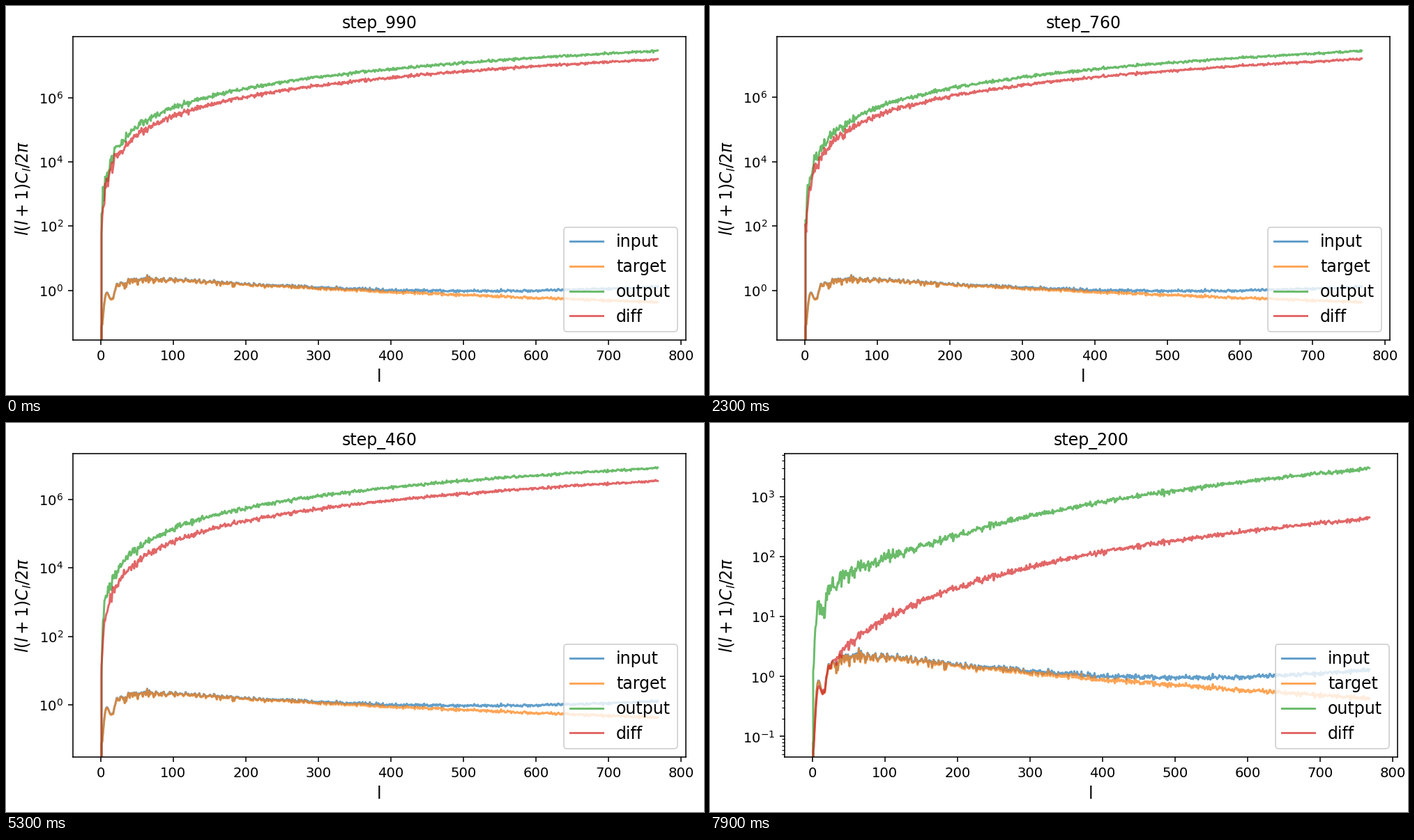
These frames come from a looping animation (1001 px wide and 559 px high, 8000 ms). A matplotlib script:

```python
import math

import numpy as np
import matplotlib.pyplot as plt
from matplotlib.animation import FuncAnimation
from matplotlib.ticker import FixedLocator, FuncFormatter

W, H, DPI = 1001, 559, 141.7
AX_W, AX_H, AX_BOTTOM = 6.2 * DPI, 3.08 * DPI, 480
FRAMES, INTERVAL = 80, 100
LMAX = 768
LOG_MIN = -1.113

ell = np.arange(LMAX + 1)
pos = ell[1:]
weight = pos * (pos + 1.0)


def scatter(rng):
    """Cosmic-variance factor for each multipole."""
    dof = 2 * pos + 1
    return rng.chisquare(dof) / dof


def fixed_spectra():
    """Target: rise, ripple and slow decay; input: target plus steep noise."""
    rng = np.random.default_rng(12)
    power = 1.45 * np.exp(-pos / 900) - .977
    power -= 1.25 * np.exp(-(pos - 1) / 18)
    power += .6 * np.exp(-pos / 12) * np.cos(2 * np.pi * (pos - 8) / 16)
    base = 10 ** np.maximum(power, LOG_MIN)
    wobble = np.where(pos > 16, scatter(rng), 1)
    own = np.where(pos > 30, rng.normal(1, .014, LMAX), 1)
    noise = .85 * (pos / LMAX) ** 3.2
    return (1.03 * base + noise) * wobble, base * wobble * own


input_cl, target_cl = fixed_spectra()


def step_spectra(i):
    """White spectra that fade with time, on top of an amplified target."""
    rng = np.random.default_rng(500 + i)
    s = i / (FRAMES - 1)
    level = 1.68 - 3.98 * s**5
    gap = .265 + .565 * s**4 - .15 * math.exp(-((i - 36) / 9) ** 2)
    low = level - gap
    n_out, n_own = scatter(rng), scatter(rng)
    n_diff = (n_out * n_own) ** .7
    out = (10**level * weight + 10 ** (2.3 + .43 * level) * target_cl) * n_out
    diff = 10**low * weight * n_diff + 10 ** (1.75 + .6 * low) * target_cl
    return out, diff


fig = plt.figure(figsize=((W + 1e-6) / DPI, (H + 1e-6) / DPI), dpi=DPI,
                 facecolor="white")
ax = fig.add_axes([0.1, 0.1, 0.8, 0.8])
ax.set_yscale("log")
ax.set_xlim(-.05 * LMAX, 1.05 * LMAX)


def set_curve(line, values):
    line.set_ydata(np.concatenate([[0.0], values]))


lines = {}
for k, name in enumerate(["input", "target", "output", "diff"]):
    lines[name], = ax.plot(ell, np.ones(LMAX + 1), color=f"C{k}", alpha=.7,
                           lw=1.5, label=name)
set_curve(lines["input"], input_cl)
set_curve(lines["target"], target_cl)

ax.set_xlabel("l", fontsize=12)
ax.set_ylabel(r"$l(l+1)C_l/2\pi$", fontsize=12)
title = ax.set_title("", fontsize=12)
ax.legend(loc="lower right", fontsize=12)
ax.yaxis.set_major_formatter(FuncFormatter(
    lambda v, _: r"$\mathdefault{10^{%d}}$" % round(math.log10(v))))
ax.yaxis.set_minor_formatter(FuncFormatter(lambda v, _: ""))


def set_scale(top_power):
    margin = .05 * (top_power - LOG_MIN)
    low, high = LOG_MIN - margin, top_power + margin
    first, last = math.ceil(low), math.floor(high)
    dense = last - first < 8
    if dense:
        major = range(first, last + 1)
        minor = [m * 10.0 ** d for d in range(first - 1, last + 1)
                 for m in range(2, 10)]
    else:
        major, minor = range(0, last + 1, 2), []
    ax.set_ylim(10 ** low, 10 ** high)
    ax.yaxis.set_major_locator(FixedLocator([10.0 ** d for d in major]))
    ax.yaxis.set_minor_locator(FixedLocator(minor))
    # the negative exponent widens the tick labels and pushes the axes right
    left = 107 if dense else 96
    ax.set_position([left / W, 1 - AX_BOTTOM / H, AX_W / W, AX_H / H])


def update(i):
    out, diff = step_spectra(i)
    set_curve(lines["output"], out)
    set_curve(lines["diff"], diff)
    title.set_text(f"step_{990 - 10 * i}")
    set_scale(math.log10(out.max()))
    return lines["output"], lines["diff"], title


anim = FuncAnimation(fig, update, frames=FRAMES, interval=INTERVAL,
                     init_func=lambda: update(0), repeat=True, repeat_delay=0,
                     blit=False)
plt.show()
```
